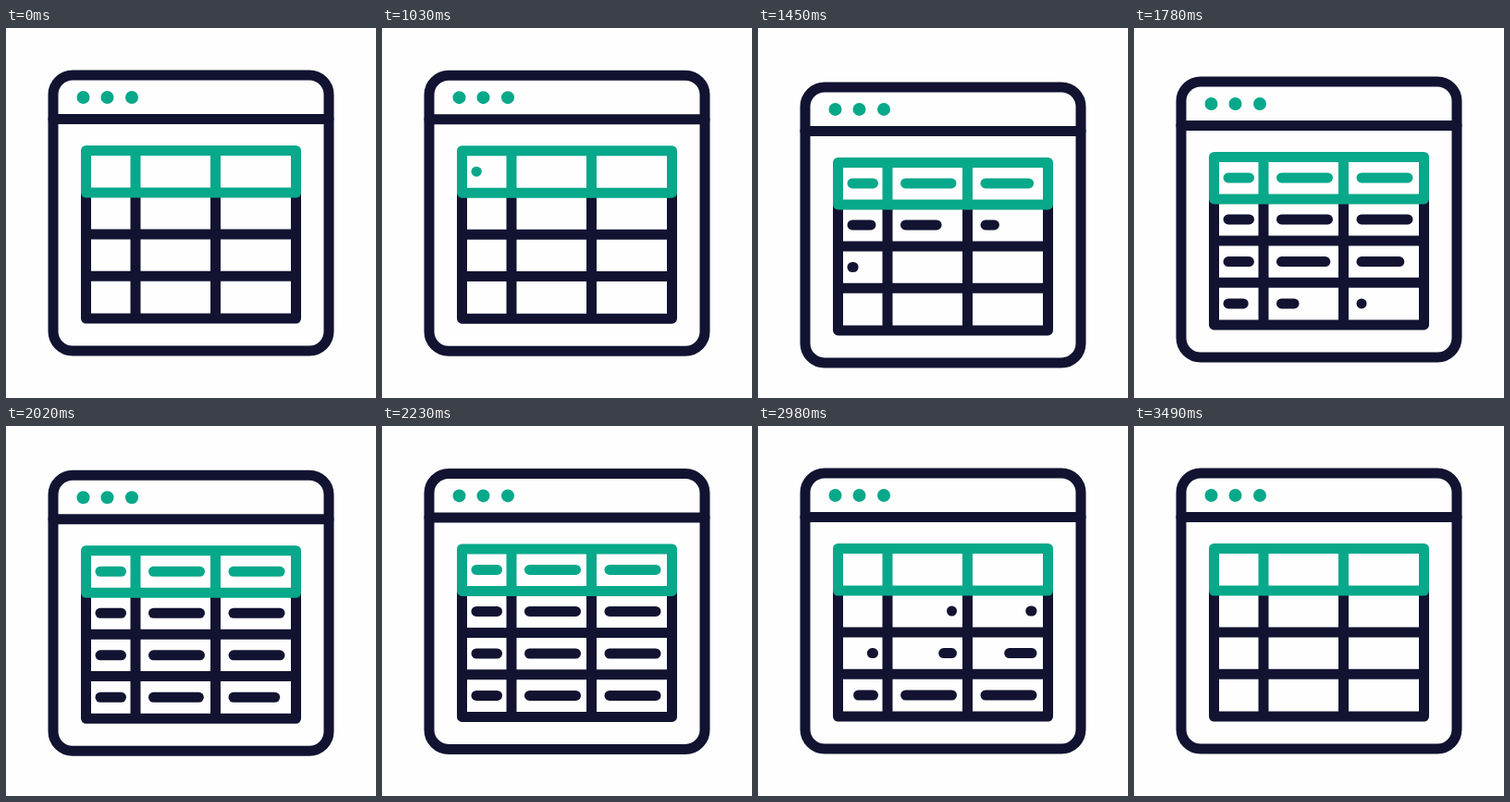
An HTML page for the animation above (3.52 s loop, 400 by 400 pixels).

```html
<!DOCTYPE html>
<html lang="en">
<head>
<meta charset="utf-8">
<title>Table window</title>
<style>
  html, body { margin: 0; height: 100%; overflow: hidden; background: #fefefe; }
  svg { display: block; width: 100vw; height: 100vh; }
  path, rect { fill: none; stroke: #121331; stroke-width: 11; stroke-linecap: round; stroke-linejoin: round; }
  .accent { stroke: #08a88a; }
  circle { fill: #08a88a; }
</style>
</head>
<body>
<svg viewBox="0 0 400 400">
  <g id="window">
    <rect x="51" y="51" width="298" height="298" rx="21"/>
    <path d="M51 98.5H349"/>
    <circle cx="83.5" cy="75" r="7"/>
    <circle cx="109.5" cy="75" r="7"/>
    <circle cx="136" cy="75" r="7"/>
    <path d="M86.5 178V314H313.5V178M86.5 223H313.5M86.5 268.3H313.5M140 178V314M226.5 178V314"/>
    <path class="accent" d="M86.5 132.5H313.5V178H86.5ZM140 132.5V178M226.5 132.5V178"/>
    <g id="dashes"></g>
  </g>
</svg>
<script>
const LOOP = 3520, HOLD = 1030, STEP = 30;
const APPEAR = 1005, VANISH = 2285, DASH_TIME = 420, ROW_DELAY = 200, COLUMN_DELAY = 83;
const DROP = 13, DROP_END = 1400, RISE_END = 2400;
const columns = [[102, 124.5], [159.5, 209.5], [246, 296]];
const rows = [155, 200, 245.6, 291];

const clamp = v => Math.min(1, Math.max(0, v));

// Cubic Bezier easing with flat ends: control points (x1, 0) and (x2, 1).
function ease(x1, x2) {
  return x => {
    x = clamp(x);
    if (x === 0 || x === 1) return x;
    let low = 0, high = 1;
    for (let i = 0; i < 24; i++) {
      const t = (low + high) / 2, u = 1 - t;
      if (3 * u * u * t * x1 + 3 * u * t * t * x2 + t ** 3 < x) low = t;
      else high = t;
    }
    return low * low * (3 - 2 * low);
  };
}
const dashEase = ease(0.33, 0.14);
const moveEase = ease(0.33, 0.4);

const win = document.getElementById("window");
const group = document.getElementById("dashes");
const dashes = rows.flatMap((y, row) => columns.map(([from, to], column) => {
  const path = document.createElementNS("http://www.w3.org/2000/svg", "path");
  if (row === 0) path.setAttribute("class", "accent");
  group.append(path);
  return { path, y, from, to, delay: row * ROW_DELAY + column * COLUMN_DELAY };
}));

function draw(time) {
  const t = time < HOLD ? 0 : HOLD + Math.floor((time - HOLD) / STEP) * STEP;
  const down = moveEase((t - APPEAR) / (DROP_END - APPEAR));
  const up = moveEase((t - DROP_END) / (RISE_END - DROP_END));
  win.setAttribute("transform", `translate(0 ${DROP * (down - up)})`);

  for (const { path, y, from, to, delay } of dashes) {
    const progress = start => dashEase((t - start - delay) / DASH_TIME);
    const head = progress(APPEAR), tail = progress(VANISH);
    const at = p => from + (to - from) * p;
    path.setAttribute("d", head > tail ? `M${at(tail)} ${y}H${at(head)}` : "");
  }
}

const began = performance.now();
function tick() {
  draw((performance.now() - began) % LOOP);
  requestAnimationFrame(tick);
}
tick();
</script>
</body>
</html>
```
